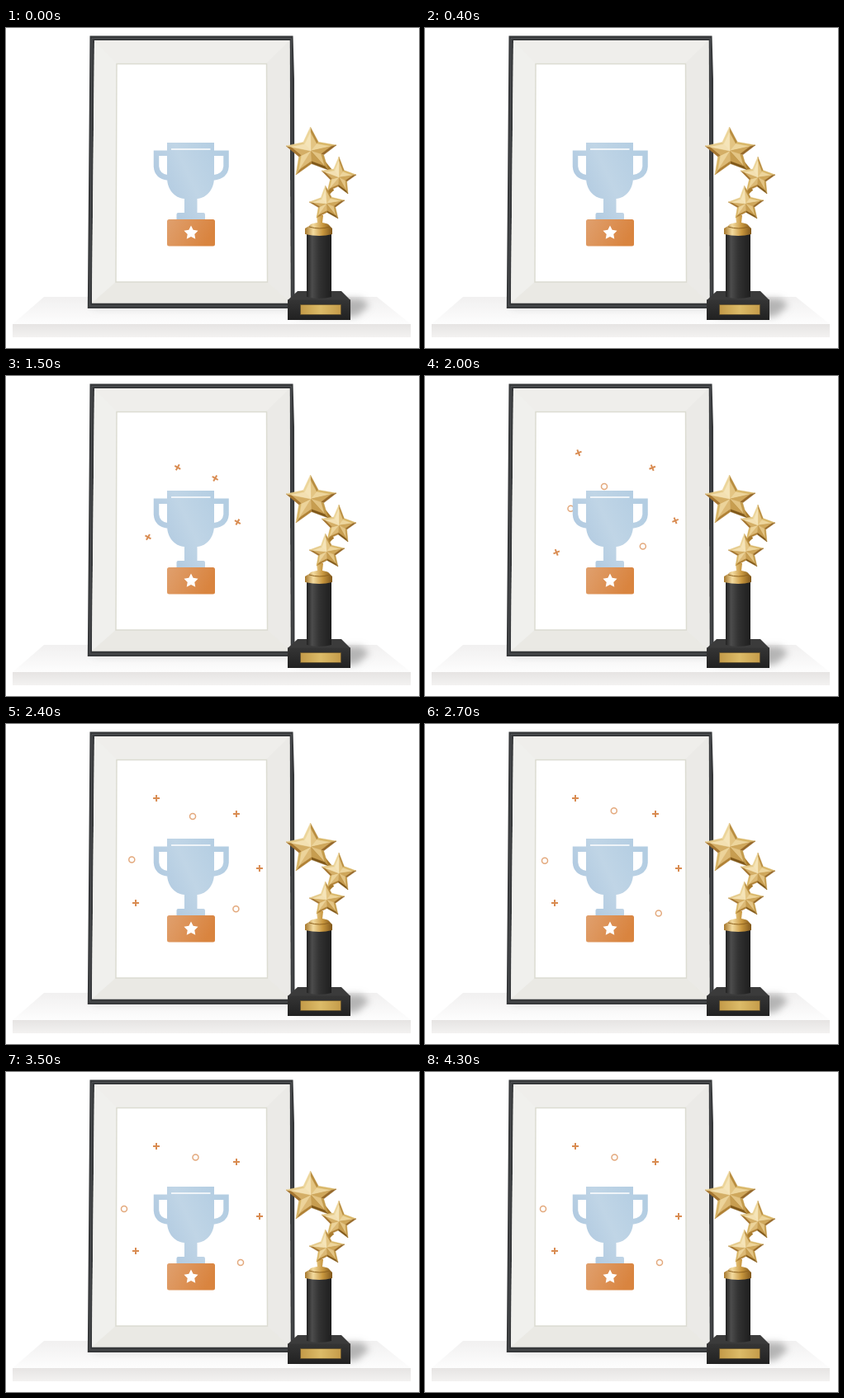
An HTML page for the animation above (4.6 s loop, 500 by 388 pixels).

```html
<!DOCTYPE html>
<html lang="en">
<head>
<meta charset="utf-8">
<title>Award shelf</title>
<style>
html, body { margin: 0; width: 100%; height: 100%; overflow: hidden; background: #fff; }
svg { display: block; width: 500px; height: 388px; }
</style>
</head>
<body>
<svg viewBox="0 0 500 388">
  <defs>
    <linearGradient id="top" x2="0" y2="1">
      <stop stop-color="#f1f0f0"/><stop offset="1" stop-color="#fdfdfd"/>
    </linearGradient>
    <linearGradient id="front" x2="0" y2="1">
      <stop stop-color="#e6e4e3"/><stop offset="1" stop-color="#f3f2f1"/>
    </linearGradient>
    <linearGradient id="cup" gradientUnits="userSpaceOnUse" x1="180" y1="205" x2="268" y2="165">
      <stop stop-color="#adc7df"/><stop offset=".5" stop-color="#c0d5e6"/><stop offset="1" stop-color="#b3cde2"/>
    </linearGradient>
    <linearGradient id="plinth" x2="1" y2=".3">
      <stop stop-color="#e0a06e"/><stop offset="1" stop-color="#d9843f"/>
    </linearGradient>
    <linearGradient id="gold">
      <stop stop-color="#a5762b"/><stop offset=".3" stop-color="#f3dba0"/>
      <stop offset=".65" stop-color="#c8973f"/><stop offset="1" stop-color="#80571a"/>
    </linearGradient>
    <linearGradient id="plate">
      <stop stop-color="#c39a48"/><stop offset=".5" stop-color="#dcbb68"/><stop offset="1" stop-color="#c59c4a"/>
    </linearGradient>
    <linearGradient id="column">
      <stop stop-color="#222"/><stop offset=".22" stop-color="#4c4c4c"/><stop offset=".5" stop-color="#333"/>
      <stop offset="1" stop-color="#1e1e1e"/>
    </linearGradient>
    <linearGradient id="block" x2="0" y2="1">
      <stop stop-color="#353535"/><stop offset="1" stop-color="#212121"/>
    </linearGradient>
    <filter id="blur" x="-30%" y="-100%" width="160%" height="300%"><feGaussianBlur stdDeviation="4"/></filter>
  </defs>

  <!-- shelf -->
  <path fill="url(#top)" d="M46 326H449L490 359H8Z"/>
  <path fill="url(#front)" d="M8 359H490V375H8Z"/>
  <g filter="url(#blur)">
    <path fill="#ccc" opacity=".5" d="M102 334H345V341H106Z"/>
    <path fill="#999" opacity=".7" d="M400 328H430L440 336L424 350H350Z"/>
  </g>

  <!-- picture frame -->
  <path fill="#36383a" d="M101.500 9.500H347.500L349 62L349.500 340H98.800L100 200Z"/>
  <path fill="none" stroke="#505255" d="M104 12.500H345.500L347 337H101.500Z"/>
  <path fill="#efeeeb" d="M107 15H343.500L344.500 333.500H104Z"/>
  <path fill="#f0f0ed" d="M107 15L134 43L133 308L104 333.500Z"/>
  <path fill="#ebeae7" d="M343.500 15L344.500 333.500L316.500 308L315 43Z"/>
  <path fill="#eae9e4" d="M104 333.500L133 308H316.500L344.500 333.500Z"/>
  <path fill="#fff" stroke="#dcdcd2" stroke-width="1.500" d="M134 43.500H315.500L316.500 308H133Z"/>

  <g id="confetti" fill="none" stroke="#d98c52"></g>

  <!-- cup -->
  <g fill="url(#cup)">
    <path d="M195 139H252V181C252 196 243 206 231.500 207V224H239Q241 224 241 226V232H206.500V226Q206.500 224 208.500 224H216V207C204 206 195 196 195 181Z"/>
    <path fill="none" stroke="url(#cup)" stroke-width="6.500" d="M196 151.700H182V168Q183 180 196 181.500M251 151.700H266.500V168Q265.500 180 251 181.500"/>
  </g>
  <path stroke="#fff" stroke-width="1.500" d="M200 147H247.500"/>
  <rect x="195" y="232" width="58" height="32.500" rx="2.500" fill="url(#plinth)"/>
  <path id="badge" fill="#fff"/>

  <!-- trophy -->
  <path fill="#3b3b3b" d="M341 330L353 319H406L417 330Z"/>
  <path fill="url(#block)" d="M341 329.500H417V354H341Z"/>
  <rect x="356.500" y="335.500" width="49" height="12" fill="url(#plate)" stroke="#5c4a26" stroke-width=".6"/>
  <path fill="url(#column)" d="M364 250H394V326Q380 330 364 326Z"/>
  <path fill="url(#gold)" d="M376 227H384L383 236Q391 237 392 240L395 243V250Q380 254 362 250V243L367 240Q368 237 377 236Z"/>
  <path fill="none" stroke="#8f631f" d="M367 241Q380 245 392 241"/>
  <path fill="none" stroke="#a87a2c" stroke-width="4" d="M385 163L394 174M396 195Q386 202 392 208"/>
  <g id="stars" stroke-linejoin="round"></g>
</svg>
<script>
const NS = 'http://www.w3.org/2000/svg';
const $ = id => document.getElementById(id);

function add(parent, tag, attrs) {
  const el = document.createElementNS(NS, tag);
  for (const key in attrs) el.setAttribute(key, attrs[key]);
  return parent.appendChild(el);
}

const outline = pts => 'M' + pts.join('L') + 'Z';

$('badge').setAttribute('d', outline(Array.from({ length: 10 }, (_, i) => {
  const r = i % 2 ? 4.5 : 9, a = (i * 36 - 90) * Math.PI / 180;
  return [224 + r * Math.cos(a), 248.5 + r * Math.sin(a)];
})));

// Gold star from its centre and five tips: a bevelled rim around a lighter face
function goldStar([cx, cy], tips) {
  const toward = ([x, y], k) => [cx + (x - cx) * k, cy + (y - cy) * k];
  const rim = tips.flatMap((tip, i) => {
    const next = tips[(i + 1) % 5];
    return [tip, toward([(tip[0] + next[0]) / 2, (tip[1] + next[1]) / 2], .6)];
  });
  const bevel = ['#b98d3f', '#d9b768', '#96692a', '#c39a4b', '#805819',
                 '#b08135', '#d8b566', '#a47530', '#e5ca8a', '#ecd59a'];
  const face = ['#e3c482', '#edd59c', '#cfa75b', '#e3c484', '#c79d50',
                '#dcb975', '#ecd39a', '#d4ae66', '#f3e0b2', '#f5e4b8'];
  const facets = (shades, k) => rim.forEach((p, i) => add($('stars'), 'path', {
    d: outline([[cx, cy], toward(p, k), toward(rim[(i + 1) % 10], k)]),
    fill: shades[i], stroke: shades[i], 'stroke-width': .4
  }));
  facets(bevel, 1);
  facets(face, .78);
}

goldStar([369, 149], [[368.5, 120], [400, 142], [390, 172], [351, 178], [339, 143]]);
goldStar([403, 181], [[403, 156], [424, 178], [414, 201], [389, 198], [382, 173]]);
goldStar([388, 213], [[386.5, 191], [410, 209], [402, 231], [376, 230], [367, 211]]);

// Each piece: start x, y, end x, y
const crosses = [[244, 140, 182, 90], [217, 145, 279, 109], [193, 165, 157, 217], [243, 180, 307, 175]];
const rings = [[206, 161, 229.5, 103.5], [206, 156, 143, 166], [246, 185, 284, 231]];

const pieces = [
  ...crosses.map(path => ({ path, begin: 1140, spin: 360, el: add($('confetti'), 'path', { d: 'M-4 0H4M0-4V4', 'stroke-width': 2 }) })),
  ...rings.map(path => ({ path, begin: 1730, spin: 0, el: add($('confetti'), 'circle', { r: 3.5, 'stroke-width': 1.5, opacity: .75 }) }))
];

function draw(t) {
  for (const { path: [x0, y0, x1, y1], begin, spin, el } of pieces) {
    const left = Math.max(0, 1 - (t - begin) / 1420) ** 3;
    el.setAttribute('visibility', t < begin ? 'hidden' : 'visible');
    el.setAttribute('transform',
      `translate(${x1 + (x0 - x1) * left} ${y1 + (y0 - y1) * left}) rotate(${-spin * left})`);
  }
}

const start = performance.now();
function tick() {
  const t = (performance.now() - start) % 4600;
  draw(Math.floor(t / 100) * 100);
  requestAnimationFrame(tick);
}
tick();
</script>
</body>
</html>
```
